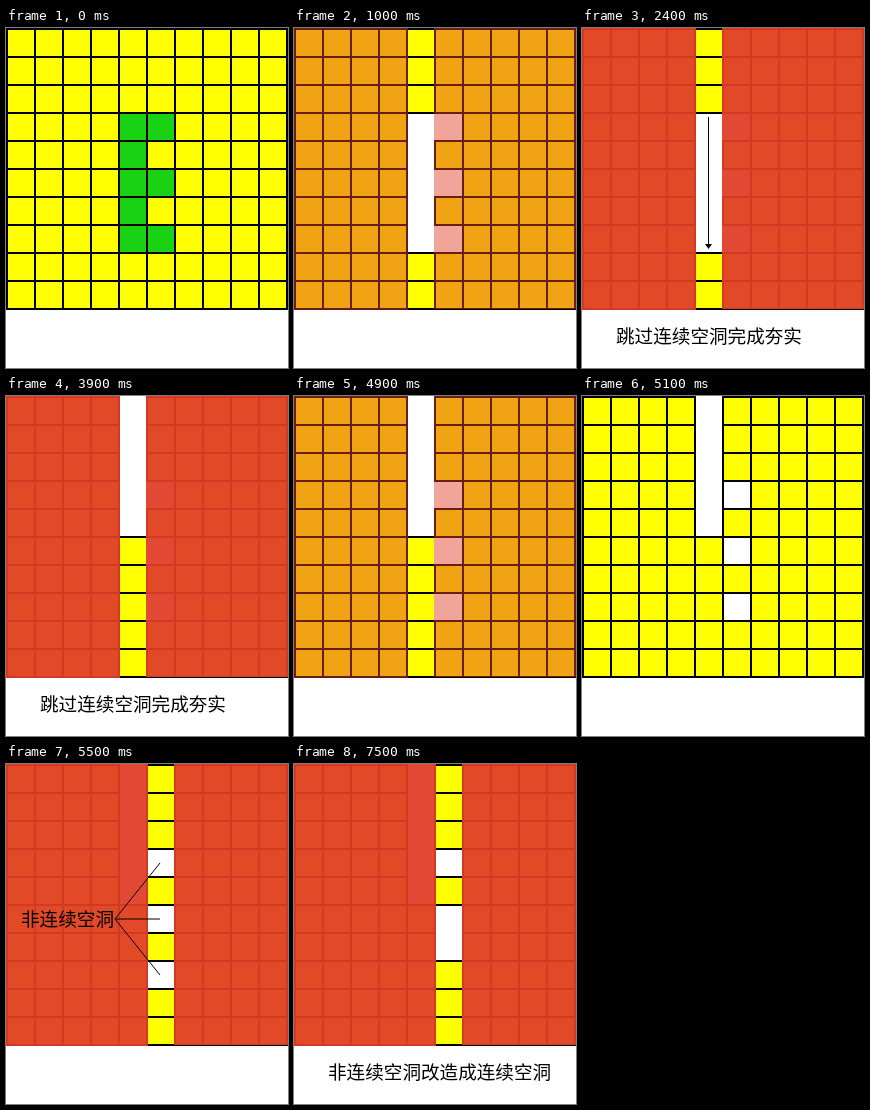
An HTML page for the animation above (8 s loop, 282x340 px).

```html
<!DOCTYPE html>
<html lang="zh">
<head>
<meta charset="utf-8">
<style>
  html, body { margin: 0; width: 282px; height: 340px; overflow: hidden; background: #fff; }
  svg { display: block; }
  text { font: 500 18.6px "Noto Sans CJK SC", "Noto Sans CJK", sans-serif; }
</style>
</head>
<body>
<svg id="stage" width="282" height="340" shape-rendering="crispEdges"></svg>
<script>
const stage = document.getElementById('stage');
const LOOP = 8000, PITCH = 28, EDGE = 2, INNER = 26, SIZE = 282;
const YELLOW = '#ffff00', GREEN = '#1ad214', RED = '#e13e29';

// A step lasts until the next one begins.
const steps = [
  { at: 0, scene: 'start' },
  { at: 500, scene: 'gap' },
  { at: 1000, scene: 'gap', cover: 0.47 },
  { at: 1200, scene: 'gap', cover: 0.94 },
  { at: 1400, scene: 'gap', cover: 0.94, label: 'joined' },
  { at: 2400, scene: 'gap', cover: 0.94, caption: 0, arrow: [126.5, 89, 221] },
  { at: 3400, scene: 'gap', cover: 0.94, caption: 0 },
  { at: 3900, scene: 'fallen', cover: 0.94, caption: 0 },
  { at: 4900, scene: 'fallen', cover: 0.47 },
  { at: 5100, scene: 'split' },
  { at: 5300, scene: 'split', cover: 0.47 },
  { at: 5500, scene: 'split', cover: 0.94, label: 'separate' },
  { at: 6500, scene: 'split', cover: 0.94, caption: 1, arrow: [154.5, 185, 216] },
  { at: 7000, scene: 'split', cover: 0.94, caption: 1 },
  { at: 7500, scene: 'merged', cover: 0.94, caption: 1 }
];
const captions = ['跳过连续空洞完成夯实', '非连续空洞改造成连续空洞'];

const rect = (x, y, w, h, fill, alpha = 1) =>
  `<rect x="${x}" y="${y}" width="${w}" height="${h}" fill="${fill}" fill-opacity="${alpha}"/>`;
const line = (x1, y1, x2, y2) =>
  `<line x1="${x1}" y1="${y1}" x2="${x2}" y2="${y2}" stroke="#000"/>`;
const text = (x, y, s) => `<text x="${x}" y="${y}">${s}</text>`;
const pos = i => EDGE + i * PITCH;
const cell = (col, row, fill) => rect(pos(col), pos(row), INNER, INNER, fill);
const hole = (col, from, to) =>
  rect(pos(col), pos(from), INNER, (to - from) * PITCH + INNER, '#fff');

function grid() {
  let out = rect(0, 0, SIZE, SIZE, '#000');
  for (let i = 0; i < 100; i++) out += cell(i % 10, Math.floor(i / 10), YELLOW);
  return out;
}

// Holes of the right column that also swallow the border on their left.
const sideHoles = () =>
  [3, 5, 7].map(r => rect(140, pos(r), PITCH, INNER, '#fff')).join('');
const emptyTop = () => rect(114, 0, INNER, 140, '#fff');

const scenes = {
  start: () => [3, 4, 5, 6, 7].map(r =>
    cell(4, r, GREEN) + (r % 2 ? cell(5, r, GREEN) : '')).join(''),
  gap: () => hole(4, 3, 7) + sideHoles(),
  fallen: () => emptyTop() + sideHoles(),
  split: () => emptyTop() + [3, 5, 7].map(r => hole(5, r, r)).join(''),
  merged: () => emptyTop() + hole(5, 3, 3) + hole(5, 5, 6)
};

const labels = {
  joined: () => text(174, 122, '连续空洞') + line(125, 152, 173, 116),
  separate: () => text(15, 162, '非连续空洞') +
    [99, 155, 211].map(y => line(109, 155, 154, y)).join('')
};

function cover(scene, alpha) {
  const left = pos(scene === 'split' || scene === 'merged' ? 5 : 4);
  const right = left + INNER;
  return rect(0, 0, left, SIZE, RED, alpha) +
    rect(right, 0, SIZE - right, SIZE - 1, RED, alpha);
}

function arrow([x, top, tip]) {
  return line(x, top, x, tip - 4) +
    `<path d="M${x - 3.5} ${tip - 5}h7l-3.5 5z" shape-rendering="geometricPrecision"/>`;
}

function draw(s) {
  let out = grid() + scenes[s.scene]();
  if (s.cover) out += cover(s.scene, s.cover);
  if (s.label) out += `<g shape-rendering="auto">${labels[s.label]()}</g>`;
  if (s.arrow) out += arrow(s.arrow);
  if (s.caption !== undefined) out += text(34, 315, captions[s.caption]);
  stage.innerHTML = out;
}

let shown, origin;
function tick(now) {
  origin ??= now;
  const t = (now - origin) % LOOP;
  const step = steps.findLast(s => s.at <= t) || steps[0];
  if (step !== shown) draw(shown = step);
  requestAnimationFrame(tick);
}
draw(shown = steps[0]);
requestAnimationFrame(tick);
</script>
</body>
</html>
```
